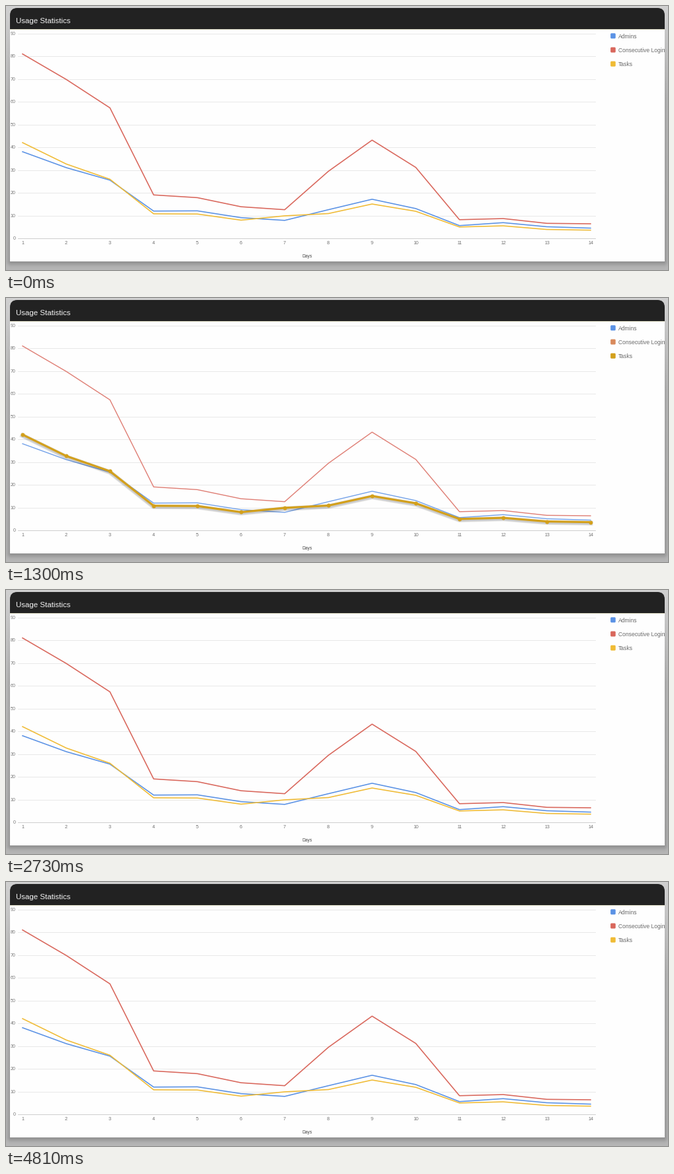
These frames come from a looping animation (1000 px wide and 400 px high, 6.5 s). A matplotlib script:

```python
import numpy as np
import matplotlib
import matplotlib.pyplot as plt
from matplotlib.animation import FuncAnimation
from matplotlib.colors import to_rgb
from matplotlib.patches import Circle, FancyBboxPatch, Rectangle

matplotlib.rcParams["toolbar"] = "None"
matplotlib.rcParams["font.family"] = "Liberation Sans"

W, H, DPI = 1000, 400, 100
STEP, FRAMES = 130, 50
PT = 72 / DPI

BLUE, RED, GOLD = "#5b92e5", "#d9675c", "#f0bb35"
DARK_GOLD = "#d3a01c"
DAYS = np.arange(1, 15)
SERIES = {
    "Admins": [37.8, 30.8, 25.3, 11.7, 11.8, 8.8, 7.6,
               12.3, 16.9, 12.8, 5.3, 6.6, 4.8, 4.2],
    "Consecutive Login": [80.8, 69.6, 57.1, 18.8, 17.6, 13.6, 12.3,
                          29.2, 42.9, 30.9, 7.9, 8.4, 6.3, 6.1],
    "Tasks": [41.8, 32.4, 25.7, 10.5, 10.4, 7.7, 9.6,
              10.6, 14.8, 11.6, 4.7, 5.2, 3.6, 3.3],
}
COLORS = dict(zip(SERIES, (BLUE, RED, GOLD)))

fig = plt.figure(figsize=(W / DPI, H / DPI), dpi=DPI)
ax = fig.add_axes([0, 0, 1, 1])
ax.set_xlim(0, W)
ax.set_ylim(H, 0)
ax.axis("off")


def px(day):
    return 25 + 66 * (np.asarray(day) - 1)


def py(value):
    return 351 - 310 / 90 * np.asarray(value)


def text(x, y, s, size, color, z=6, **kw):
    """Text whose capitals are centred on y; size is in pixels."""
    return ax.text(x, y + 0.36 * size, s, fontsize=size * PT, color=color,
                   va="baseline", zorder=z, **kw)


def box(x0, y0, x1, y1, r, color, edge="none", z=1, lw=0.0, **kw):
    return ax.add_patch(FancyBboxPatch(
        (x0 + r, y0 + r), x1 - x0 - 2 * r, y1 - y0 - 2 * r,
        boxstyle=f"round,pad={r}", fc=color, ec=edge, lw=lw * PT,
        zorder=z, **kw))


def rect(x0, y0, x1, y1, color, z=1):
    return ax.add_patch(Rectangle((x0, y0), x1 - x0, y1 - y0, fc=color,
                                  ec="none", zorder=z))


def line(x, y, color, width, z, **kw):
    return ax.plot(x, y, color=color, lw=width * PT, zorder=z,
                   solid_joinstyle="round", **kw)[0]


def backdrop():
    yy, xx = np.mgrid[0:H, 0:W] + 0.5
    grey = 209 - 26 * (yy / H) ** 0.6
    dx = np.maximum(np.maximum(8 - xx, xx - 993), 0)
    dy = np.maximum(yy - 387, 0)
    depth = np.clip((yy - 20) / 120, 0, 1)
    grey -= 36 * depth * np.exp(-(dx ** 2 + dy ** 2) / 40)
    img = np.repeat(grey[..., None] / 255, 3, axis=2)
    ax.imshow(img, extent=(0, W, H, 0), aspect="auto", zorder=0)


def card():
    box(6, 3, 995, 60, 11, "#222222")
    rect(6, 35.5, 995, 387, "#fefefe", 2)
    rect(6, 35, 995, 36, "#dedcc4", 2)
    text(15, 21.5, "Usage Statistics", 11.5, "#f2f2f2")


def axes():
    for v in range(0, 91, 10):
        y = round(float(py(v))) + 0.5
        line([18, 890], [y, y], "#cfcfcf" if v == 0 else "#e8e8e8", 1, 3)
        text(14.5, y - 0.5, str(v), 7.2, "#777777", ha="right")
    for d in DAYS:
        text(px(d), 358.5, str(d), 7.2, "#707070", ha="center")
    text(455.5, 379, "Days", 6.7, "#444444", ha="center")


def curves():
    return {name: line(px(DAYS), py(vals), COLORS[name], 1.6, 4)
            for name, vals in SERIES.items()}


def legend():
    marks = {}
    for i, name in enumerate(SERIES):
        y = 45.3 + 21.2 * i
        marks[name] = box(913.2, y - 4, 920.8, y + 4, 1.5, COLORS[name], z=5)
        text(925, y + 0.5, name, 8.55, "#6b6b6b")
    return marks


def highlight(name):
    x, y = px(DAYS), py(SERIES[name])
    parts = [line(x, y + 1.5, "black", w, 4.5, alpha=0.07)
             for w in (7.5, 6, 4.5)]
    parts.append(line(x, y, DARK_GOLD, 3.2, 5, marker="o",
                      ms=6 * PT, mew=0))
    return parts


def tooltip(name, day, left, right, pad, dark):
    value = SERIES[name][day - 1]
    x, y = float(px(day)), float(py(value))
    top, bottom = y - 87, y - 9
    parts = [box(left - g, top + 1 - g, right + g, bottom + 1.5 + g, 2 + g,
                 "black", z=7, alpha=0.05) for g in (0.5, 1.5, 2.5)]
    parts.append(box(left, top, right, bottom, 2, "white", "#cccccc",
                     z=8, lw=1))
    tx = left + pad
    parts += [
        text(tx, top + 18, str(day), 8, "#4a4a4a", 9, weight="bold"),
        text(tx, top + 41, name, 8.3, "#858585", 9),
        text(tx, top + 57.5, f"{value:.1f}", 14.2, COLORS[name], 9),
    ]
    for r, c, a in ((4.2, "black", 0.12), (3.2, dark, 1),
                    (1.2, COLORS[name], 1)):
        parts.append(ax.add_patch(Circle((x, y), r, fc=c, ec="none",
                                         alpha=a, zorder=9)))
    return parts


backdrop()
card()
axes()
plots = curves()
marks = legend()
glow = highlight("Tasks")
tip_admins = tooltip("Admins", 7, 399, 443, 8, "#2f62b5")
tip_tasks = tooltip("Tasks", 11, 666.5, 704, 8.5, "#cf9c22")

# (artists, first ms, end ms)
SHOWN = [(tip_admins, 780, 910), (glow, 1300, 1820), (tip_tasks, 3900, 4810)]


def fade(color, amount):
    return tuple(c + (1 - c) * amount for c in to_rgb(color))


def update(i):
    t = i * STEP
    for parts, start, end in SHOWN:
        for p in parts:
            p.set_visible(start <= t < end)
    focus = 1300 <= t < 1820
    for name, curve in plots.items():
        curve.set_color(fade(COLORS[name], 0.15 if focus else 0))
        curve.set_linewidth((1.4 if focus else 1.6) * PT)
    marks["Tasks"].set_facecolor(DARK_GOLD if focus else GOLD)
    marks["Consecutive Login"].set_facecolor("#d98a5c" if focus else RED)
    return []


anim = FuncAnimation(fig, update, frames=FRAMES, interval=STEP,
                     init_func=lambda: update(0), repeat=True,
                     repeat_delay=0, blit=False)
plt.show()
```
